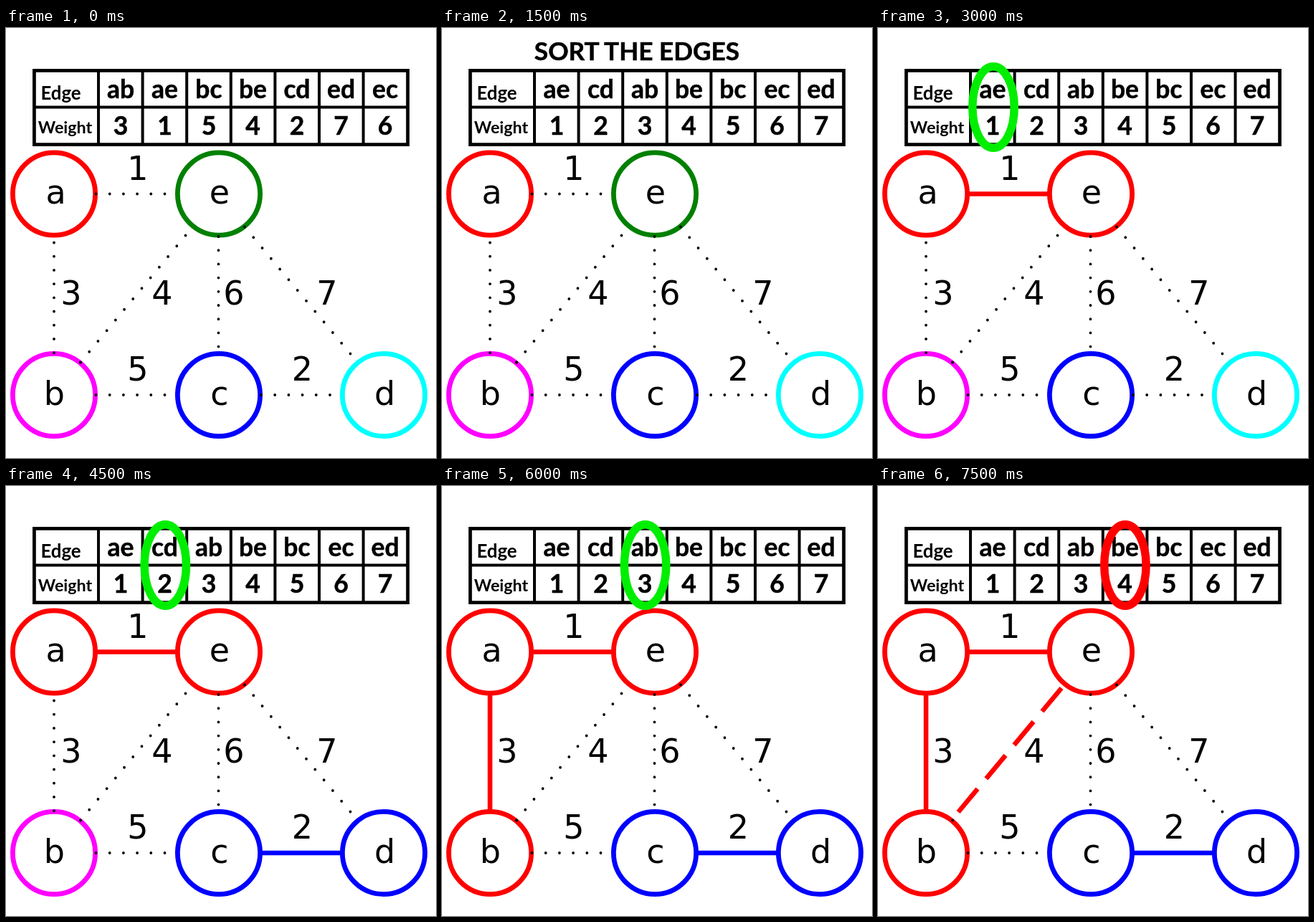
An HTML page for the animation above (8000 ms loop, 600 px wide and 600 px high).

```html
<!DOCTYPE html>
<html lang="en">
<head>
<meta charset="utf-8">
<title>Sorting and picking edges</title>
<style>
  html, body { margin: 0; width: 100%; height: 100%; overflow: hidden; background: #fff; }
  svg { display: block; width: 100%; height: 100%; }
  text { text-anchor: middle; fill: #000; }
  .table { font: bold 35.5px Lato, sans-serif; stroke: #000; stroke-width: 0.5; }
  .graph { font: 46px "DejaVu Sans", sans-serif; }
  .grid { fill: none; stroke: #000; stroke-width: 4; }
  .frame { fill: none; stroke: #000; stroke-width: 4.8; }
  .node { fill: #fff; stroke-width: 6.8; }
  .solid { fill: none; stroke-width: 6.6; }
  .dots { stroke: #000; stroke-width: 3.8; stroke-linecap: round; }
  .ring { fill: none; stroke-width: 11.5; }
</style>
</head>
<body>
<svg id="stage" viewBox="0 0 600 600"></svg>
<script>
const STEP = 1500, LOOP = 8000, DOT_GAP = 19.2;
const stage = document.getElementById("stage");

function add(tag, attrs, content = "") {
  const el = document.createElementNS("http://www.w3.org/2000/svg", tag);
  for (const key in attrs) el.setAttribute(key, attrs[key]);
  el.textContent = content;
  return stage.appendChild(el);
}
const label = (cls, x, y, content, style = "") =>
  add("text", { class: cls, x, y, style }, content);
const show = (el, on) => { el.style.visibility = on ? "visible" : "hidden"; };

const nodes = {
  a: { x: 67, y: 231.5, color: "#f00", tx: 69.5 },
  e: { x: 297, y: 231.5, color: "#008000", tx: 298, joins: 2, next: "#f00" },
  b: { x: 67, y: 512, color: "#f0f", tx: 67.3, joins: 4, next: "#f00" },
  c: { x: 297, y: 512, color: "#00f", tx: 298 },
  d: { x: 527, y: 512, color: "#0ff", tx: 528.5, joins: 3, next: "#00f" }
};

// dots: centres of the first and last dot
const edges = {
  ae: { weight: 1, at: [184, 212], dots: [125.5, 231.5, 221.5, 231.5], picked: 2, color: "#f00" },
  cd: { weight: 2, at: [413.5, 492], dots: [356, 512, 452, 512], picked: 3, color: "#00f" },
  ab: { weight: 3, at: [91, 386], dots: [67, 299.5, 67, 453.1], picked: 4, color: "#f00" },
  be: { weight: 4, at: [218, 386], dots: [250.5, 289.5, 104, 466.5], picked: 5, color: "#f00" },
  bc: { weight: 5, at: [184, 492], dots: [125.5, 512, 221.5, 512] },
  ec: { weight: 6, at: [318, 386], dots: [296.5, 291, 296.5, 444.6] },
  ed: { weight: 7, at: [448, 386], dots: [333, 277.5, 480.5, 454.5] }
};
const unsorted = ["ab", "ae", "bc", "be", "cd", "ed", "ec"];
const sorted = Object.keys(edges);

// Table
const column = i => 160 + 61.5 * i;
const bars = sorted.map((_, i) => `M${129 + 61.6 * i} 59V162`).join("");
add("path", { class: "grid", d: `M39 110.5H561${bars}` });
add("path", { class: "frame", d: "M39.4 59.4H560.6V162.6H39.4Z" });
label("table", 76.5, 100, "Edge", "font-size:25.8px;stroke:none");
label("table", 82.5, 147, "Weight", "font-size:23.3px;stroke:none");
const title = label("table", 272, 45, "SORT THE EDGES", "font-size:35.2px");
const cells = sorted.map((_, i) => ({
  name: label("table", column(i), 98),
  weight: label("table", column(i), 149)
}));
const ring = add("ellipse", { class: "ring", cy: 110.5, rx: 29.2, ry: 56.7 });

// Graph
for (const [name, edge] of Object.entries(edges)) {
  if (!edge.picked) continue;
  const from = nodes[name[0]], to = nodes[name[1]];
  const rejected = name === "be";
  edge.line = add("path", {
    class: "solid",
    stroke: edge.color,
    d: rejected ? "M256 282L112 455" : `M${from.x} ${from.y}L${to.x} ${to.y}`,
    "stroke-dasharray": rejected ? "42.3 18.7" : "none"
  });
}
for (const [name, node] of Object.entries(nodes)) {
  node.ring = add("circle", { class: "node", cx: node.x, cy: node.y, r: 57.6 });
  label("graph", node.tx, node.y < 300 ? 245 : 526, name);
}
for (const edge of Object.values(edges)) {
  const [x1, y1, x2, y2] = edge.dots;
  const length = Math.hypot(x2 - x1, y2 - y1);
  // Slightly short, so that rounding never drops the last dot
  const gap = length / Math.round(length / DOT_GAP) * 0.9999;
  edge.dotted = add("line", { class: "dots", x1, y1, x2, y2, "stroke-dasharray": `0 ${gap}` });
  label("graph", ...edge.at, edge.weight);
}
// One dot stays at the end of the rejected edge
add("circle", { cx: 104, cy: 466.5, r: 1.9 });
stage.append(ring);

function render(step) {
  show(title, step === 1);
  (step ? sorted : unsorted).forEach((name, i) => {
    cells[i].name.textContent = name;
    cells[i].weight.textContent = edges[name].weight;
  });
  show(ring, step >= 2);
  ring.setAttribute("cx", 161 + 61.3 * Math.max(0, step - 2));
  ring.setAttribute("stroke", step === 5 ? "#f00" : "#0e0");
  for (const node of Object.values(nodes)) {
    node.ring.setAttribute("stroke", step >= node.joins ? node.next : node.color);
  }
  for (const edge of Object.values(edges)) {
    const picked = step >= edge.picked;
    show(edge.dotted, !picked);
    if (edge.line) show(edge.line, picked);
  }
}

const start = performance.now();
let current = 0;
function tick() {
  const step = Math.floor((performance.now() - start) % LOOP / STEP);
  if (step !== current) render(current = step);
  requestAnimationFrame(tick);
}
render(current);
tick();
</script>
</body>
</html>
```
